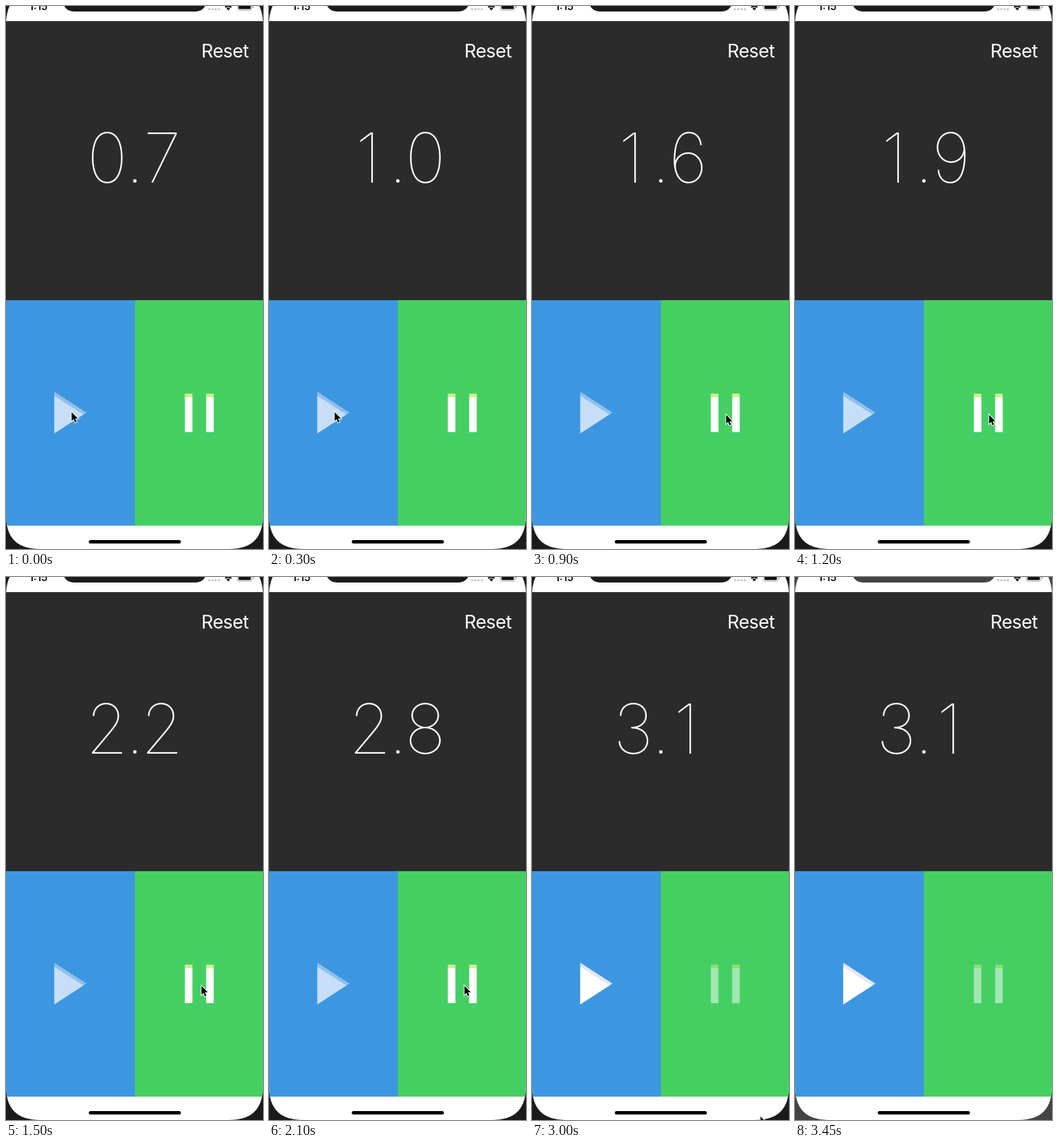
These frames come from a looping animation (374x790 px, 3550 ms). An HTML page with a canvas:

```html
<!DOCTYPE html>
<html lang="en">
<head>
<meta charset="utf-8">
<title>Stopwatch</title>
<style>
  html, body { margin: 0; height: 100%; overflow: hidden; background: #1c1a1b; }
  canvas { display: block; }
</style>
</head>
<body>
<canvas id="stage" width="374" height="790"></canvas>
<script>
const ctx = document.getElementById('stage').getContext('2d');
const LOOP = 3550, STEP = 150;
const FONT = 'Inter, Roboto, sans-serif';

// Pointer stops: step, left, top
const STOPS = [
  [0, 94, 589], [4, 196, 593], [5, 250, 593], [6, 281, 593], [9, 283, 593],
  [18, 294, 669], [19, 312, 744], [20, 331, 783], [21, 400, 800]
];

const SCREEN = new Path2D(
  'M0 28C0-6 16-22 50-22H324C358-22 374-6 374 28V740C374 774 358 790 324 790H50C16 790 0 774 0 740Z');
const ARROW = new Path2D('M1.5 1.8V14.8L4.4 12.1 6.5 17 8.6 16.1 6.5 11.3H10.7Z');

function rect(color, x, y, w, h) {
  ctx.fillStyle = color;
  ctx.fillRect(x, y, w, h);
}

function round(color, x, y, w, h, r) {
  ctx.fillStyle = color;
  ctx.beginPath();
  ctx.roundRect(x, y, w, h, r);
  ctx.fill();
}

function shape(color, path) {
  ctx.fillStyle = color;
  ctx.fill(new Path2D(path));
}

// Writes text with its visible ink centred on x
function write(text, x, y, weight, size, color, spacing = 0) {
  ctx.font = `${weight} ${size}px ${FONT}`;
  ctx.letterSpacing = spacing + 'px';
  ctx.fillStyle = color;
  const m = ctx.measureText(text);
  ctx.fillText(text, x + (m.actualBoundingBoxLeft - m.actualBoundingBoxRight) / 2, y);
}

function statusBar(bezel) {
  round(bezel, 83, -22, 208.5, 30, 20);
  write('1:15', 47, 6.3, 600, 15, '#111');
  for (let i = 0; i < 4; i++) round('#ccc', 293.8 + i * 4.7, 3, 3.6, 3.6, 1.8);
  shape('#111', 'M323.5 6.4L320.7 3.6A4 4 0 0 1 326.3 3.6Z');
  ctx.strokeStyle = '#111';
  ctx.lineWidth = 2.1;
  ctx.beginPath();
  ctx.arc(323.5, 6.5, 6.3, -Math.PI * 0.75, -Math.PI * 0.25);
  ctx.stroke();
  ctx.strokeStyle = '#a8a8a8';
  ctx.lineWidth = 1;
  ctx.beginPath();
  ctx.roundRect(336.5, -4.5, 21.5, 10.8, 3);
  ctx.stroke();
  round('#111', 338.3, -3, 18, 7.6, 1.4);
  round('#a8a8a8', 359.2, -1, 1.5, 4, 0.7);
}

function counter(value) {
  const [whole, tenth] = value.toFixed(1).split('.');
  const digit = (d, x) => write(d, d === '1' ? x - 5 : x, 256.8, 100, 100, '#fff');
  digit(whole, 147.2);
  write('.', 187.5, 256.8, 100, 100, '#fff');
  digit(tenth, 227.4);
}

function playIcon(alpha) {
  ctx.globalAlpha = alpha;
  const glyph = new Path2D('M70.3 561.3L117 591.5 70.3 621.8Z');
  ctx.save();
  ctx.clip(glyph);
  rect('#e4e7fb', 70, 561, 48, 61);
  shape('#fff', 'M70 567L113 594.5V622H70Z');
  ctx.restore();
  ctx.globalAlpha = 1;
}

function pauseIcon(alpha, body, cap) {
  ctx.globalAlpha = alpha;
  for (const x of [260.3, 291.3]) {
    rect(cap, x, 564, 11, 5);
    rect(body, x, 569, 11, 51);
  }
  ctx.globalAlpha = 1;
}

function pointer(step) {
  const [, x, y] = STOPS.filter(s => s[0] <= step).pop();
  ctx.save();
  ctx.translate(x, y);
  ctx.strokeStyle = '#fff';
  ctx.lineWidth = 2;
  ctx.stroke(ARROW);
  ctx.fillStyle = '#000';
  ctx.fill(ARROW);
  ctx.restore();
}

function draw(step) {
  const bezel = step === 23 ? '#454344' : '#1c1a1b';
  rect(bezel, 0, 0, 374, 790);
  ctx.save();
  ctx.clip(SCREEN);
  rect('#fff', 0, 0, 374, 790);
  rect('#2b2b2b', 0, 22, 374, 406);
  rect('#3d97e0', 0, 428, 188, 328);
  rect('#45cf63', 187.5, 428, 187, 328);
  round('#000', 120.5, 777, 134, 5, 2.5);
  statusBar(bezel);
  ctx.restore();

  write('Reset', 320, 75, 400, 27, '#fff', -0.6);
  counter(Math.floor(7 + 1.5 * Math.min(step, 16)) / 10);

  const stopped = step > 16, pressed = step === 16;
  playIcon(stopped ? 1 : 0.5);
  if (pressed) pauseIcon(1, '#808080', '#677845');
  else pauseIcon(stopped ? 0.5 : 1, '#fff', '#cdf08c');
  pointer(step);
}

const start = performance.now();
function tick() {
  draw(Math.floor((performance.now() - start) % LOOP / STEP));
  requestAnimationFrame(tick);
}
tick();
</script>
</body>
</html>
```
